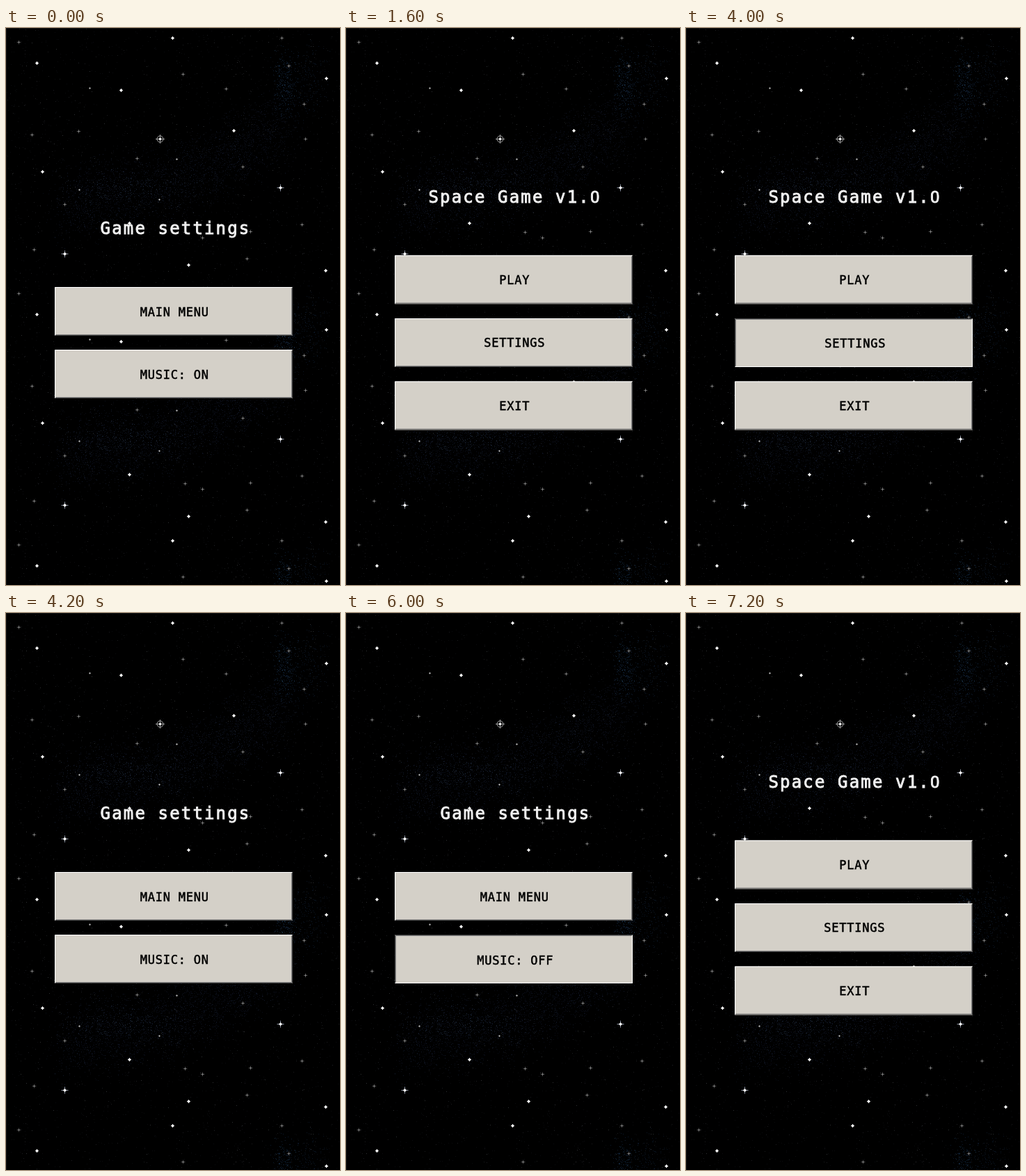
An HTML page for the animation above (8000 ms loop, 480 by 800 pixels).

```html
<!DOCTYPE html>
<html lang="en">
<head>
<meta charset="utf-8">
<title>Space Game</title>
<style>
  html, body { margin: 0; width: 100%; height: 100%; overflow: hidden; background: #000; }
  svg { display: block; width: 480px; height: 800px; }
  text { font-family: "DejaVu Sans Mono", "Liberation Mono", monospace; text-anchor: middle; white-space: pre; }
  .title { font-size: 24px; letter-spacing: 2.15px; fill: #f2f2f2; stroke: #f2f2f2; stroke-width: .9; }
  .zero { font-family: Roboto, sans-serif; }
  .label { font-size: 17px; letter-spacing: .75px; fill: #000; stroke: #000; stroke-width: .5; }
</style>
</head>
<body>
<svg id="stage" viewBox="0 0 480 800" xmlns="http://www.w3.org/2000/svg">
  <defs><pattern id="sky" width="480" height="361" patternUnits="userSpaceOnUse"></pattern></defs>
  <rect width="480" height="800" fill="#000"/>
  <rect width="480" height="800" fill="url(#sky)"/>
  <path d="M0 .5H480M.5 0V800" stroke="#141414"/>
  <g id="ui"></g>
</svg>
<script>
const LOOP = 8000;
const sky = document.getElementById('sky');
const ui = document.getElementById('ui');

function add(parent, tag, attrs, content) {
  const node = document.createElementNS('http://www.w3.org/2000/svg', tag);
  for (const key in attrs) node.setAttribute(key, attrs[key]);
  if (content) node.textContent = content;
  parent.appendChild(node);
  return node;
}

let seed = 4217;
function random() {
  seed = (seed * 1664525 + 1013904223) % 4294967296;
  return seed / 4294967296;
}
const spread = size => (random() + random() + random() - 1.5) * size;

function speckles(count, color, place) {
  let d = '';
  for (let i = 0; i < count; i++) {
    const [x, y] = place().map(Math.floor);
    d += `M${x} ${y + .5}h1`;
  }
  add(sky, 'path', { d, stroke: color });
}

// The nebula follows a curved band, with a brighter knot at its upper right end.
function band() {
  const u = random();
  return [80 + 325 * u + spread(28), 254 - 55 * u - 72 * u ** 3 + spread(52)];
}
const knot = () => [402 + spread(16), 80 + spread(44)];
const anywhere = () => [random() * 480, random() * 361];

speckles(1500, '#0a0b0e', anywhere);
speckles(380, '#1b1c1f', anywhere);
speckles(90, '#2e3032', anywhere);
speckles(2400, '#090c16', band);
speckles(600, '#101726', band);
speckles(170, '#1a2432', () => [185 + spread(95), 231 + spread(24)]);
speckles(260, '#0c1a2b', knot);
speckles(40, '#182f42', knot);
speckles(160, '#0a1422', () => [436 + spread(24), 76 + spread(54)]);

const cross = r => `M${-r} 0H${r}M0 ${-r}V${r}`;
const diamond = r => `M0 ${-r}L${r} 0L0 ${r}L${-r} 0Z`;

function stars(points, draw) {
  for (const [x, y] of points) draw(add(sky, 'g', { transform: `translate(${x + .5} ${y + .5})` }));
}

stars([[18, 20], [396, 14], [406, 54], [254, 66], [316, 87], [428, 109], [37, 153], [104, 148],
  [430, 159], [188, 187], [340, 199], [84, 253], [282, 301], [257, 293], [351, 292], [425, 282],
  [40, 318], [346, 331]], g => {
  add(g, 'path', { d: cross(2.8), stroke: '#484848' });
  add(g, 'path', { d: diamond(1.4), fill: '#858585' });
});
stars([[120, 86], [245, 188], [105, 232], [220, 246]], g =>
  add(g, 'path', { d: diamond(1.4), fill: '#bbb' }));
stars([[44, 50], [239, 14], [460, 72], [165, 89], [327, 147], [52, 206], [177, 280],
  [262, 340], [459, 348]], g => {
  add(g, 'path', { d: cross(2.6), stroke: '#777' });
  add(g, 'path', { d: diamond(2.4), fill: '#fff' });
});
stars([[394, 229], [84, 324]], g => {
  add(g, 'path', { d: cross(5), stroke: '#8a91a0' });
  add(g, 'path', { d: diamond(2.6), fill: '#fff' });
});
stars([[221, 159]], g => {
  add(g, 'path', { d: cross(6.5), stroke: '#8c8c8c' });
  add(g, 'circle', { r: 4.5, fill: 'none', stroke: '#aaa' });
  add(g, 'path', { d: diamond(2.2), fill: '#fff' });
});

function bevel(parent, pressed) {
  const edge = (inset, corner, color) => {
    const l = inset, t = inset, r = 342 - inset, b = 70 - inset;
    const d = corner === 'top' ? `M${l} ${b}V${t}H${r}` : `M${l} ${b}H${r}V${t}`;
    add(parent, 'path', { d, fill: 'none', stroke: color });
  };
  const dark = pressed ? 'top' : 'bottom';
  const light = pressed ? 'bottom' : 'top';
  edge(1.5, dark, '#808080');
  edge(.5, light, '#fff');
  edge(.5, dark, '#404040');
}

function button(parent, y, baseline, label, pressed) {
  const g = add(parent, 'g', { transform: `translate(70 ${y})` });
  add(g, 'rect', { width: 342, height: 70, fill: '#d4d0c8' });
  bevel(g, pressed);
  const shift = pressed ? 1 : 0;
  add(parent, 'text', { class: 'label', x: 242.3 + shift, y: baseline + shift }, label);
}

function menuScreen(pressed) {
  const g = add(ui, 'g', {});
  const title = add(g, 'text', { class: 'title', x: 242.5, y: 250.5 }, 'Space Game v1.');
  add(title, 'tspan', { class: 'zero' }, '0');
  button(g, 326.5, 368, 'PLAY');
  button(g, 417, 458, 'SETTINGS', pressed === 'settings');
  button(g, 507.5, 549, 'EXIT');
  return g;
}

function settingsScreen(music, pressed) {
  const g = add(ui, 'g', {});
  add(g, 'text', { class: 'title', x: 243.5, y: 296 }, 'Game settings');
  button(g, 372, 413.5, 'MAIN MENU', pressed === 'menu');
  button(g, 462, 503.5, 'MUSIC: ' + music, pressed === 'music');
  return g;
}

const timeline = [
  [0, settingsScreen('ON')],
  [1600, menuScreen()],
  [4000, menuScreen('settings')],
  [4200, settingsScreen('ON')],
  [4800, settingsScreen('ON', 'music')],
  [5000, settingsScreen('OFF')],
  [6000, settingsScreen('OFF', 'music')],
  [6200, settingsScreen('ON')],
  [6800, settingsScreen('ON', 'menu')],
  [7000, menuScreen()]
];

function render(time) {
  const t = time % LOOP;
  const current = timeline.filter(([start]) => start <= t).pop()[1];
  for (const [, screen] of timeline) screen.style.display = screen === current ? '' : 'none';
}

function tick() {
  render(performance.now());
  requestAnimationFrame(tick);
}
tick();
</script>
</body>
</html>
```
